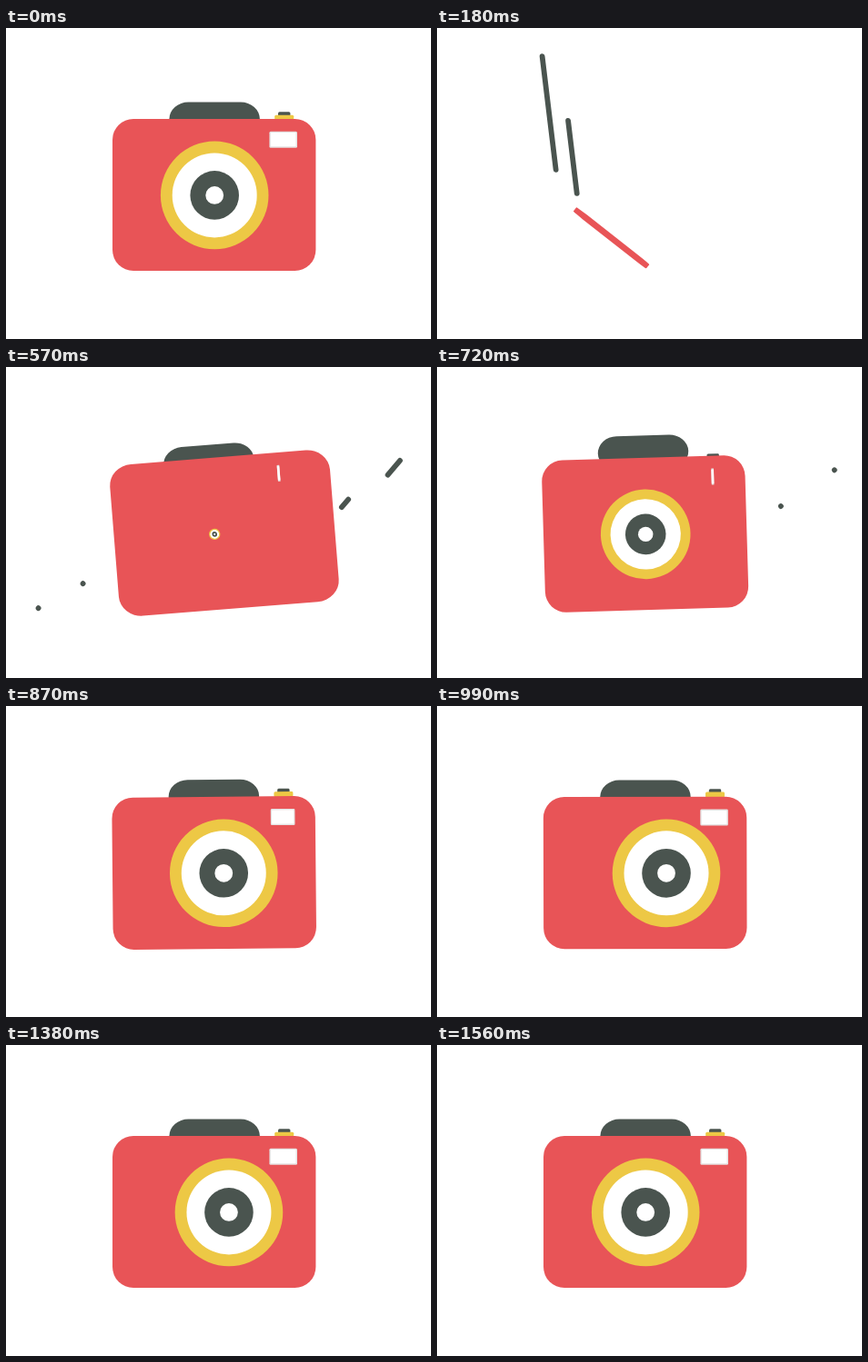
Animation, 467 px wide and 342 px high, one loop 1.8 s. Source, as an HTML page with a canvas:

```html
<!DOCTYPE html>
<html lang="en">
<head>
<meta charset="utf-8">
<title>Camera</title>
<style>
html, body { margin: 0; width: 100%; height: 100%; overflow: hidden; background: #fff; }
canvas { display: block; }
</style>
</head>
<body>
<canvas id="stage" width="467" height="342"></canvas>
<script>
const ctx = document.getElementById('stage').getContext('2d');
const RED = '#e85457', DARK = '#4a544f', YELLOW = '#edc845', WHITE = '#fff';
const LOOP = 1800, STEP = 30, START = 90;
const CX = 228.7, CY = 183.5;

const progress = (t, from, length) => Math.min(1, Math.max(0, (t - from) / length));
const easeOut = u => 1 - (1 - u) ** 2;
const backOut = u => 1 + 2.7 * (u - 1) ** 3 + 1.7 * (u - 1) ** 2;
const easeSine = u => (1 - Math.cos(Math.PI * u)) / 2;

// Diagonal streaks on x + y = sum, running from x = from to x = to
const streaks = [
  { sum: -133, from: 50, to: -199, head: 110, tail: 188, end: 660 },
  { sum: -105, from: 12, to: -148, head: 110, tail: 188, end: 660 },
  { sum: 124, from: 42, to: 150, head: 207, tail: 312, end: 780 },
  { sum: 146, from: 12, to: 210, head: 207, tail: 312, end: 780 }
];

function box(x, y, w, h, radius, color) {
  ctx.beginPath();
  ctx.roundRect(x, y, w, h, radius);
  ctx.fillStyle = color;
  ctx.fill();
}

function disc(r, color) {
  ctx.beginPath();
  ctx.arc(0, 0, r, 0, 2 * Math.PI);
  ctx.fillStyle = color;
  ctx.fill();
}

// Draws a part around (x, y) with its own scale
function part(x, y, sx, sy, paint) {
  if (!sx || !sy) return;
  ctx.save();
  ctx.translate(x, y);
  ctx.scale(sx, sy);
  paint();
  ctx.restore();
}

function drawHump(t) {
  if (t < 410) return;
  const rise = 64 * (1 - backOut(progress(t, 410, 500)));
  box(-49.3, -102 + rise, 99.5, 37, { x: 21, y: 18.5 }, DARK);
}

function drawButton(t) {
  if (t < 650) return;
  const drop = 12 * (1 - backOut(progress(t, 650, 480)));
  box(70.3, -91.2 + drop, 13.4, 6, 1.5, DARK);
  box(66.5, -87.8 + drop, 21, 6, 1.5, YELLOW);
}

function drawBody(t) {
  const sx = Math.max(0.03, backOut(progress(t, 250, 470)));
  const sy = easeOut(progress(t, START, 240));
  const pivot = -89 - 0.18 * (t - 330);
  part(pivot * (1 - sx), 0, sx, sy, () => box(-111.7, -83.6, 223.4, 167.2, 23, RED));
}

function drawFlash(t) {
  const sx = 0.09 + 0.91 * easeOut(progress(t, 720, 240));
  const sy = easeOut(progress(t, 325, 260));
  part(76, -60.8, sx, sy, () => {
    box(-15.3, -9, 30.6, 18, 1.5, '#e4e2e2');
    box(-13.9, -7.6, 27.8, 15.2, 0.5, WHITE);
  });
}

function drawLens(t) {
  const size = easeOut(progress(t, 555, 280));
  const shift = t < 1200
    ? easeOut(progress(t, 800, 400))
    : 1 - easeSine(progress(t, 1200, 360));
  part(0.5 + 31.5 * shift, 0.4, size, size, () => {
    disc(59.3, YELLOW);
    disc(46.5, WHITE);
    disc(26.8, DARK);
    disc(9.9, WHITE);
  });
}

function drawStreaks(t) {
  ctx.strokeStyle = DARK;
  ctx.lineWidth = 5.8;
  ctx.lineCap = 'round';
  for (const { sum, from, to, head, tail, end } of streaks) {
    if (t < head || t >= end) continue;
    const at = start => from + (to - from) * easeOut(progress(t, start, 354));
    const a = at(tail), b = at(head) + 0.01;
    ctx.beginPath();
    ctx.moveTo(a, sum - a);
    ctx.lineTo(b, sum - b);
    ctx.stroke();
  }
}

function draw(t) {
  ctx.fillStyle = WHITE;
  ctx.fillRect(0, 0, 467, 342);
  const angle = Math.max(0, 90.25 * Math.exp(-0.0061 * (t - START)) - 0.25);
  ctx.save();
  ctx.translate(CX, CY);
  ctx.rotate(-angle * Math.PI / 180);
  for (const paint of [drawHump, drawButton, drawBody, drawFlash, drawLens, drawStreaks]) paint(t);
  ctx.restore();
}

function tick() {
  const t = Math.floor(performance.now() % LOOP / STEP) * STEP;
  draw(t < START ? LOOP : t);
  requestAnimationFrame(tick);
}
tick();
</script>
</body>
</html>
```
